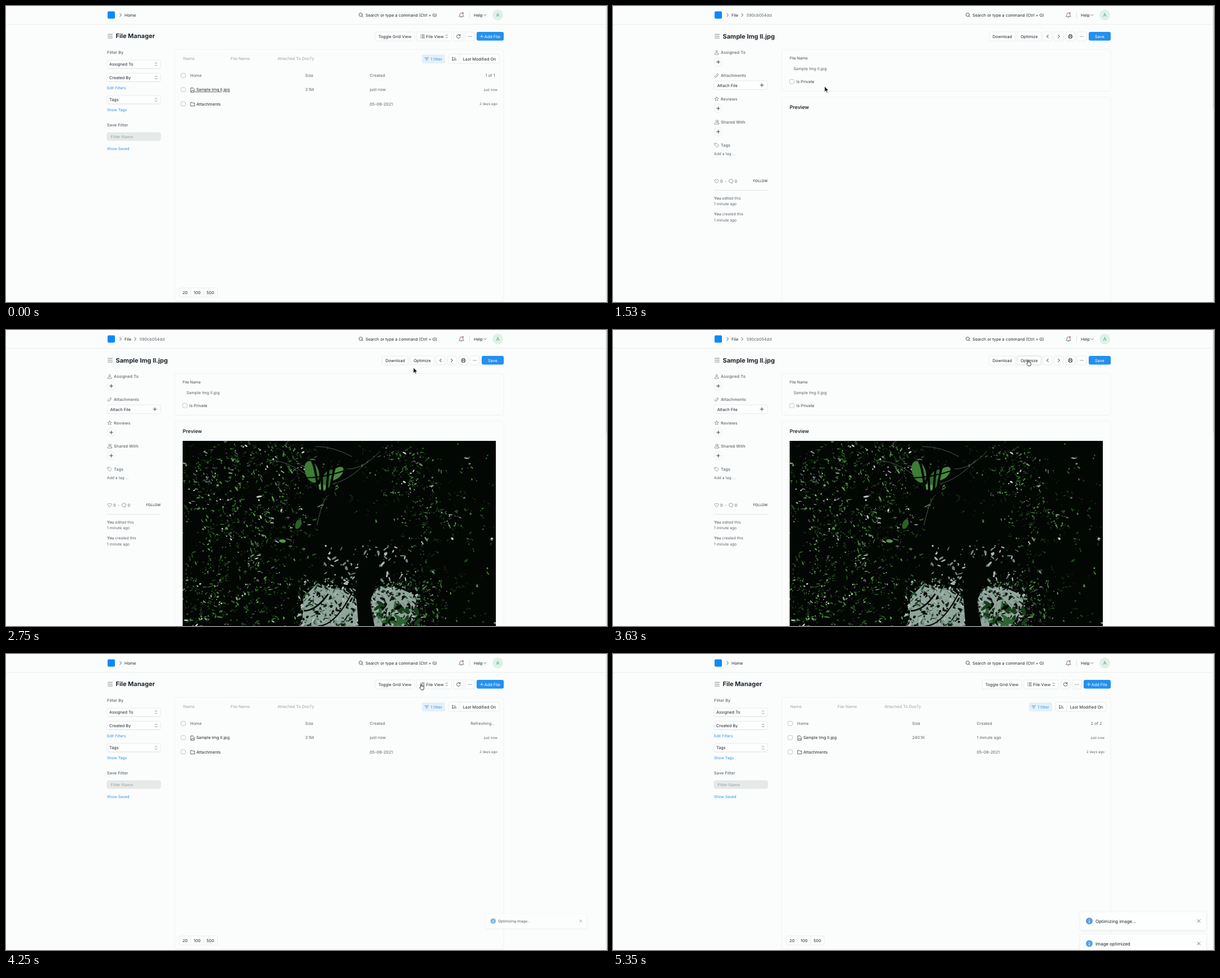
Recreate the animation shown at these times as an HTML page with a canvas. Size 1065x526 px, loop 5.81 s.

```html
<!DOCTYPE html>
<html lang="en">
<head>
<meta charset="utf-8">
<title>File Manager</title>
<style>
html, body { margin: 0; width: 100%; height: 100%; overflow: hidden; background: #fbfdfc; }
canvas, svg { position: absolute; left: 0; top: 0; }
canvas { left: 313px; top: 197px; }
text { font-family: Inter, sans-serif; text-rendering: geometricPrecision; white-space: pre; }
.toast rect { filter: drop-shadow(0 1px 2px rgba(20, 40, 50, .1)); }
</style>
</head>
<body>
<canvas id="photo" width="555" height="329"></canvas>
<svg id="stage" width="1065" height="526" viewBox="0 0 1065 526"></svg>
<script>
const LOOP = 5810;
const INK = '#1f272e', MUTED = '#5a646c', PALE = '#98a1a8', BLUE = '#2490ef', LINE = '#e4e8e7';

// y is the middle of the capitals
const text = (x, y, s, o = {}) => {
  const { size = 7.27, fill = INK, weight = 400, anchor = 'start', gap = 0 } = o;
  return `<text x="${x}" y="${y + size * 0.36}" font-size="${size}" fill="${fill}" font-weight="${weight}" text-anchor="${anchor}" letter-spacing="${gap}">${s}</text>`;
};
const box = (x, y, x2, y2, fill = '#fdfefe', stroke = LINE, r = 3) =>
  `<rect x="${x}" y="${y}" width="${x2 - x}" height="${y2 - y}" rx="${r}" fill="${fill}" stroke="${stroke}" stroke-width=".8"/>`;
const path = (d, stroke = MUTED, w = 0.8, fill = 'none') =>
  `<path d="${d}" fill="${fill}" stroke="${stroke}" stroke-width="${w}" stroke-linecap="round" stroke-linejoin="round"/>`;
const icon = (x, y, d, stroke, w, fill) => `<g transform="translate(${x} ${y})">${path(d, stroke, w, fill)}</g>`;
const group = (id, body, cls = '') => `<g id="${id}" class="${cls}">${body}</g>`;
const button = (x, x2, label) =>
  box(x, 46, x2, 62) + (label ? text((x + x2) / 2, 54, label, { anchor: 'middle' }) : '');

const PLUS = 'M-3 0H3M0-3V3';
const NEXT = 'M-1.3-2.7L1.4 0L-1.3 2.7';
const PREV = 'M1.3-2.7L-1.4 0L1.3 2.7';
const UPDOWN = 'M-1.7-1.3L0-3L1.7-1.3M-1.7 1.3L0 3L1.7 1.3';
const DOTS = 'M-2.4 0h.1M0 0h.1M2.4 0h.1';
const CROSS = 'M-2.6-2.6L2.6 2.6M2.6-2.6L-2.6 2.6';

const common = () =>
  path('M0 32.5H1065', '#e8ebea') +
  path('M1064 0V526', '#d5d9d8', 1.4) +
  box(180, 9.5, 193, 22.5, '#0a89ff', 'none', 2) +
  icon(203, 16, NEXT, INK) +
  icon(628.5, 15.5, 'M2.2 2.2L4 4M3 0A3 3 0 1 1-3 0A3 3 0 1 1 3 0', INK) +
  text(637, 16, 'Search or type a command (Ctrl + G)') +
  icon(807, 16, 'M-4 2.5Q-2.7 1.5-2.7-1Q-2.7-4 0-4Q2.7-4 2.7-1Q2.7 1.5 4 2.5ZM-1 4H1', MUTED) +
  '<circle cx="809.8" cy="12.5" r="1.2" fill="#e24c4c"/>' +
  path('M821.5 10.5V21.5', '#d5dad9') +
  text(829, 16, 'Help') +
  icon(849, 16, 'M-2.4-1L0 1.4L2.4-1', MUTED) +
  '<circle cx="871.5" cy="16" r="9.5" fill="#dff1e7"/>' +
  text(871.5, 16, 'A', { size: 8.6, fill: '#48a674', anchor: 'middle' }) +
  path('M180.5 50.3H188.5M180.5 53.6H188.5M180.5 56.9H188.5', MUTED);

const select = (y, label) =>
  box(179, y - 7.5, 274, y + 7.5) + path(`M181 ${y + 7.6}H272`, '#d9dedd', .6) +
  text(183, y, label) + icon(266, y, UPDOWN, MUTED, .7);
const check = (x, y) => box(x - 3.9, y - 3.9, x + 3.9, y + 3.9, '#fff', '#aeb7bd', 2);
const link = (y, s) => text(179, y, s, { size: 6.75, fill: BLUE });
const sideHead = (x, y, s) => text(x, y, s, { size: 7.2, fill: MUTED, gap: 0.14, weight: 450 });

const listPage = () => {
  const col = (x, y, s) => text(x, y, s, { fill: MUTED });
  const ago = (y, s) => text(871, y, s, { size: 6.15, fill: MUTED, anchor: 'end' });
  return text(210, 16, 'Home') +
    text(194.5, 53.3, 'File Manager', { size: 11, weight: 700 }) +
    sideHead(179, 82.5, 'Filter By') + select(103.5, 'Assigned To') + select(127, 'Created By') +
    link(145.5, 'Edit Filters') + select(166.5, 'Tags') + link(184.5, 'Show Tags') +
    sideHead(179, 211.5, 'Save Filter') + box(179, 225, 274, 239, '#e5e9e8', '#e0e4e3') +
    text(185.5, 232.3, 'Filter Name', { fill: PALE }) + link(253.3, 'Show Saved') +
    button(654, 724, 'Toggle Grid View') + button(728, 789.5) +
    icon(738, 54, 'M-1.2-2.6H3.4M-1.2 0H3.4M-1.2 2.6H3.4M-3.4-2.6h.2M-3.4 0h.2M-3.4 2.6h.2', INK, .8) +
    text(744.5, 54, 'File View') + icon(781, 54, UPDOWN, MUTED, .7) +
    button(793.5, 810) + icon(801.8, 54, 'M2.8-1.6A3.2 3.2 0 1 0 3.2.6M3.1-3.6V-1.5H1', INK) +
    button(813.5, 830) + icon(821.8, 54, DOTS, INK, 1.1) +
    box(834, 46, 882, 61.5, BLUE, 'none') + icon(843, 54, PLUS, '#fff', .7) +
    text(847.8, 54, 'Add File', { fill: '#fff' }) +
    box(299, 77, 882, 525, 'none', '#eceFee', 4) +
    [[314, 'Name'], [398, 'File Name'], [481, 'Attached To DocTy']].map(([x, s]) => text(x, 93.3, s, { fill: PALE })).join('') +
    box(737, 86, 778, 102, '#e5f0f8', 'none') +
    icon(745.5, 94, 'M-3.5-2.2H3.5M-2.3 0H2.3M-1 2.2H1', BLUE) + text(752.5, 94, '1 filter', { fill: '#3c98e6' }) +
    box(784, 85.5, 874, 102) + path('M804 86V101.5', LINE) +
    icon(794.3, 94, 'M-2.5-3V3M-4-1.6L-2.5-3M-4 1.4L-2.5 3L-1 1.4M.2-2H1.8M.2 0H2.9M.2 2H4', INK, .7) +
    text(809.7, 94, 'Last Modified On') +
    check(314, 123.5) + check(314, 148.5) + check(314, 174) +
    col(326.3, 123.7, 'Home') + col(530, 123.7, 'Size') + col(644.5, 123.7, 'Created') +
    group('count', '') +
    icon(330.5, 149, 'M-3 4V-3.5H.8L3 -1.3V4ZM-1.8 2.8L-.4.9L.6 2L1.5 1.2L2.4 2.8', INK, .7) +
    text(337.2, 148.7, 'Sample Img II.jpg') +
    group('underline', path('M335.5 152.7H373M375.5 152.7H382M385 152.7H386M388.5 152.7H392M395 152.7H396', INK, .7)) +
    group('size', '') + group('made', '') + ago(148.7, 'just now') +
    icon(330.7, 174.3, 'M-3.6 3V-3H-.8L.2-1.8H3.6V3Z', INK, .7) +
    text(337.2, 174.2, 'Attachments') + col(644.5, 174.2, '05-08-2021') + ago(174.2, '2 days ago') +
    box(307, 501, 374.5, 517) + path('M327.5 501.5V516.5M350.5 501.5V516.5', LINE) +
    [[317.3, 20], [338.8, 100], [362, 500]].map(([x, n]) => text(x, 509, n, { anchor: 'middle' })).join('');
};

const formPage = () => {
  const round = y => `<circle cx="186.5" cy="${y}" r="7.5" fill="#fdfefe" stroke="${LINE}" stroke-width=".8"/>` + icon(186.5, y, PLUS, INK);
  const log = (y, verb) =>
    text(179, y, `<tspan font-weight="600">You</tspan> ${verb} this`, { size: 6.75, fill: MUTED }) +
    text(179, y + 10.2, '1 minute ago', { size: 6.75, fill: MUTED });
  const person = 'M1.6-2A1.6 1.6 0 1 1-1.6-2A1.6 1.6 0 1 1 1.6-2M-3.4 3.4V2.4Q-3.2.8-1.4.8H1.4Q3.2.8 3.4 2.4V3.4Z';
  const heads = [
    [82.5, 'Assigned To', person],
    [123.7, 'Attachments', 'M3-1.2L-.6 2.6Q-2 3.8-3 2.6Q-4 1.4-2.8.2L.4-3Q1.6-4 2.4-3Q3.2-2 2.2-1L-1 2'],
    [165, 'Reviews', 'M0-3.6L1-1.1L3.6-1L1.6.7L2.3 3.3L0 1.8L-2.3 3.3L-1.6.7L-3.6-1L-1-1.1Z'],
    [206.3, 'Shared With', person + 'M2.4-3.4Q4.2-2 2.6-.4M2.8.9Q4.4 1.4 4.4 3.4'],
    [247.4, 'Tags', 'M-3.5-3.3H.2L3.8.4L.6 3.6L-3.5-.4ZM-1.7-1.6h.2']
  ];
  return text(210, 16, 'File') + icon(229, 16, NEXT, INK) + text(236.7, 16, '590cb054dd', { fill: MUTED }) +
    text(194.5, 54, 'Sample Img II.jpg', { size: 11, weight: 700 }) +
    heads.map(([y, s, d]) => icon(183.6, y, d, MUTED, .6) + sideHead(191, y, s)).join('') +
    round(99.5) + round(182) + round(223.3) +
    box(179, 133, 274, 148.5) + text(184.5, 141, 'Attach File') + icon(263.8, 140.7, PLUS, INK) +
    text(179, 263, 'Add a tag ...', { size: 6.75, fill: MUTED }) +
    icon(183.5, 311.2, 'M0 3.3L-3.2.1Q-4.3-2-2.6-2.9Q-1-3.4 0-1.8Q1-3.4 2.6-2.9Q4.3-2 3.2.1Z', MUTED, .6) +
    text(190, 311.2, '0', { fill: MUTED }) + text(198.5, 311.2, '·', { fill: MUTED, weight: 700 }) +
    icon(209, 311.2, 'M3.6-.3A3.6 3.2 0 1 0 0 2.9L2.6 3.6L2.4 2Q3.6 1 3.6-.3', MUTED, .6) +
    text(215.5, 311.2, '0', { fill: MUTED }) +
    text(274, 311, 'FOLLOW', { size: 6.15, anchor: 'end' }) +
    path('M179 327.5H274', '#dce1e0') + log(341.5, 'edited') + log(370, 'created') +
    button(666.5, 713, 'Download') + button(716, 759, 'Optimize') +
    group('pressed', box(716, 46, 759, 62, 'none', '#d8dcde')) +
    button(762, 778) + icon(770, 54, PREV, INK, 1) + button(782, 798) + icon(790, 54, NEXT, INK, 1) +
    button(802, 819) + icon(810.5, 54, 'M-2-1.4V-3.4H2V-1.4M-2 1.8H-3.3V-1.4H3.3V1.8H2M-2 .6H2V3.4H-2Z', INK) +
    button(822, 839) + icon(830.5, 54, DOTS, INK, 1.1) +
    box(843, 46, 882, 61.5, BLUE, 'none') + text(862.3, 54, 'Save', { fill: '#fff', anchor: 'middle' }) +
    box(299, 77, 882, 151.5, 'none', '#eceFee', 4) + box(299, 162, 882, 540, 'none', '#eff2f1', 4) +
    text(313, 93, 'File Name', { size: 6.75, fill: '#3a444c' }) +
    text(319.7, 111, 'Sample Img II.jpg', { fill: MUTED }) +
    check(317, 134.3) + text(325, 134.3, 'Is Private', { fill: '#3a444c' }) +
    text(313, 180, 'Preview', { size: 8.9, weight: 600 }) +
    path('M1064 0V182', '#c3c8c7', 1.4);
};

const toast = (id, label) => group(id,
  box(-112, -16, 111, 16, '#fdfefe', 'none') +
  '<circle cx="-96" cy="0" r="6" fill="#5b9fdc"/>' +
  path('M-96-2.6v.1M-96-.6V3', '#fff', 1.2) +
  text(-85, .3, label, { size: 7.9 }) + icon(98, 0, CROSS, MUTED, .9), 'toast');

const $ = id => document.getElementById(id);
$('stage').innerHTML = common() + group('list', listPage()) + group('form', formPage()) +
  toast('toast1', 'Optimizing image...') + toast('toast2', 'Image optimized') +
  group('arrow', path('M0 0V9.6L2.2 7.6L3.8 11.1L5.3 10.4L3.8 7.1H6.9Z', '#fff', .6, '#111')) +
  group('hand', path('M2.5 5.6V1.2Q2.5.4 3.2.4T3.9 1.2V4Q5.2 3.4 5.6 4.3Q6.8 3.9 7 4.8Q8.3 4.6 8.3 6V7.5Q8.2 9 7.4 10.8H3.4Q2.6 9.2.7 7.2Q.3 6 1.4 6Z', '#111', .8, '#fff'));

// Foliage against a bright sky, from seeded specks
function paintPhoto() {
  const c = $('photo').getContext('2d');
  let seed = 77;
  const rnd = () => (seed = (seed * 16807) % 2147483647) / 2147483647;
  const pick = a => a[Math.floor(rnd() * a.length)];
  const leaf = (x, y, rx, ry, a, fill) => {
    c.fillStyle = fill;
    c.beginPath();
    c.ellipse(x, y, rx, ry, a, 0, 7);
    c.fill();
  };
  const blob = (pts, fill) => {
    c.fillStyle = fill;
    c.beginPath();
    pts.forEach(p => c.lineTo(...p));
    c.fill();
  };
  const twig = (x, y, x2, y2, color, w) => {
    c.strokeStyle = color;
    c.lineWidth = w;
    c.beginPath();
    c.moveTo(x, y);
    c.quadraticCurveTo((x + x2) / 2, y, x2, y2);
    c.stroke();
  };
  const DARK = '#030704';
  const greens = ['#0f220e', '#16300f', '#1f4a1b', '#2c6326', '#3f8035', '#5c9c4e'];
  const grays = ['#2f3b34', '#56675e', '#8fa198', '#c8d3ce'];
  c.fillStyle = DARK;
  c.fillRect(0, 0, 555, 329);

  // foliage thickens around these centres: x, y, radius
  const thick = [[70, 70, 75], [150, 140, 65], [190, 30, 55], [50, 290, 75], [150, 270, 50], [390, 40, 50], [450, 130, 50], [430, 290, 50]];
  const density = (x, y) => thick.reduce((s, [a, b, r]) => s + Math.exp(-((x - a) ** 2 + (y - b) ** 2) / r ** 2), .1);
  for (let i = 0; i < 2600; i++) {
    const x = rnd() * 555, y = rnd() * 329;
    const trunk = Math.abs(x - 285 - (y - 150) * .2) < 32 && y > 130;
    if (trunk || rnd() > density(x, y)) continue;
    const tilt = rnd() * 2.4 - 1.2;
    const tone = pick(rnd() < .2 ? grays : greens);
    for (let k = 0; k < 4; k++)
      leaf(x + rnd() * 12 - 6, y + rnd() * 10 - 5, .6 + rnd() * rnd() * 5, .4 + rnd() * 1.2, tilt + rnd() * .8, k > 1 ? DARK : tone);
  }

  blob([[212, 329], [214, 278], [240, 252], [262, 262], [290, 266], [316, 288], [308, 329]], '#8fa59c');
  blob([[332, 329], [334, 268], [352, 258], [384, 262], [416, 276], [410, 302], [392, 329]], '#8fa59c');
  for (let i = 0; i < 620; i++) {
    const x = 205 + rnd() * 215, y = 245 + rnd() * 84;
    leaf(x, y, 1 + rnd() * 4, .5 + rnd() * 1.6, rnd() * 3, pick([DARK, DARK, '#12200f', '#a9bcb4', '#6d8579', '#24502a']));
  }
  for (let i = 0; i < 110; i++)
    leaf(250 + rnd() * 150, 185 + rnd() * 70, 1 + rnd() * 4, .6 + rnd() * 1.6, rnd() * 3, pick(['#a9bbb3', '#6f867b', DARK]));
  blob([[312, 329], [306, 260], [314, 215], [340, 200], [344, 255], [332, 285], [340, 329]], DARK);
  twig(215, 302, 258, 272, DARK, 3);
  twig(240, 329, 300, 270, DARK, 2);
  for (let i = 0; i < 26; i++)
    leaf(345 + rnd() * 75, 288 + rnd() * 40, 6 + rnd() * 5, 2 + rnd() * 2, rnd() * 3, pick([DARK, '#173d1a', '#2a6530']));

  for (const [x, y, x2, y2] of [[236, 10, 300, 28], [250, 78, 330, 34], [292, 50, 350, 18], [150, 34, 222, 62], [262, 95, 238, 150]])
    twig(x, y, x2, y2, '#4c574f', 1);
  leaf(229, 55, 12, 20, -.35, '#3d7d35');
  leaf(256, 70, 10, 21, .5, '#2f6a29');
  leaf(273, 58, 8, 15, .8, '#468a3c');
  leaf(246, 82, 9, 5, .1, '#58984b');
  leaf(205, 148, 5, 9, .4, '#2b6226');
  leaf(177, 178, 6, 3, .1, '#4f9744');
  for (const x of [228, 244, 262, 276]) twig(x, 36, 250 + (x - 250) * .4, 98, DARK, 4);
  twig(212, 66, 290, 52, DARK, 2);
}
paintPhoto();

// time, x, y, shape
const POINTER = [
  [0], [1050, 375, 143, 'arrow'], [2210, 440, 139, 'arrow'], [2330, 540, 128, 'arrow'],
  [2450, 628, 115, 'arrow'], [2600, 687, 92, 'arrow'], [2750, 722, 67, 'arrow'],
  [2900, 737, 66, 'arrow'], [3020, 732.3, 53, 'hand'], [5110, 810, 98, 'arrow'],
  [5230, 936, 171, 'arrow'], [5350]
];
const TICKS = [0, 3630, 3750, 3870, 3990, 4110, 4250, 4370, 4490, 4610, 4730, 4850];
const show = (id, on) => { $(id).style.display = on ? '' : 'none'; };
const put = (id, html) => {
  if ($(id).dataset.html === html) return;
  $(id).dataset.html = html;
  $(id).innerHTML = html;
};
const clamp = v => Math.min(1, Math.max(0, v));

// Slide in small from the right, then grow to full size
function placeToast(id, age, y) {
  show(id, age >= 0);
  const slide = 1700 * (1 - clamp(age / 550)) ** 2.2;
  const grow = clamp((age - 620) / 120);
  $(id).setAttribute('transform', `translate(${940 + slide} ${y}) scale(${.8 + .2 * grow})`);
  $(id).setAttribute('opacity', .75 + .25 * grow);
}

function render(t) {
  const form = t >= 1050 && t < 4250;
  show('list', !form);
  show('form', form);
  show('photo', form && t >= 1680);
  show('underline', t < 1050);
  show('pressed', t >= 3630);

  const done = t >= 4490;
  const count = done ? '2 of 2' : t >= 4250 ? 'Refreshing...' : '1 of 1';
  put('count', text(866.5, 123.7, count, { fill: MUTED, anchor: 'end' }));
  put('size', text(530, 148.7, done ? '240.1K' : '3.1M', { fill: MUTED }));
  put('made', text(644.5, 148.7, done ? '1 minute ago' : 'just now', { fill: MUTED }));

  const tick = TICKS.findLast(v => v <= t);
  placeToast('toast1', tick - 3630, t < 4250 ? 514.5 : 474.5);
  placeToast('toast2', tick - 4110, 514.5);

  const [, x, y, shape] = POINTER.findLast(p => p[0] <= t);
  for (const id of ['arrow', 'hand']) {
    show(id, id === shape);
    if (id === shape) $(id).setAttribute('transform', `translate(${x} ${y})`);
  }
}

const start = performance.now();
function loop() {
  render((performance.now() - start) % LOOP);
  requestAnimationFrame(loop);
}
loop();
</script>
</body>
</html>
```
